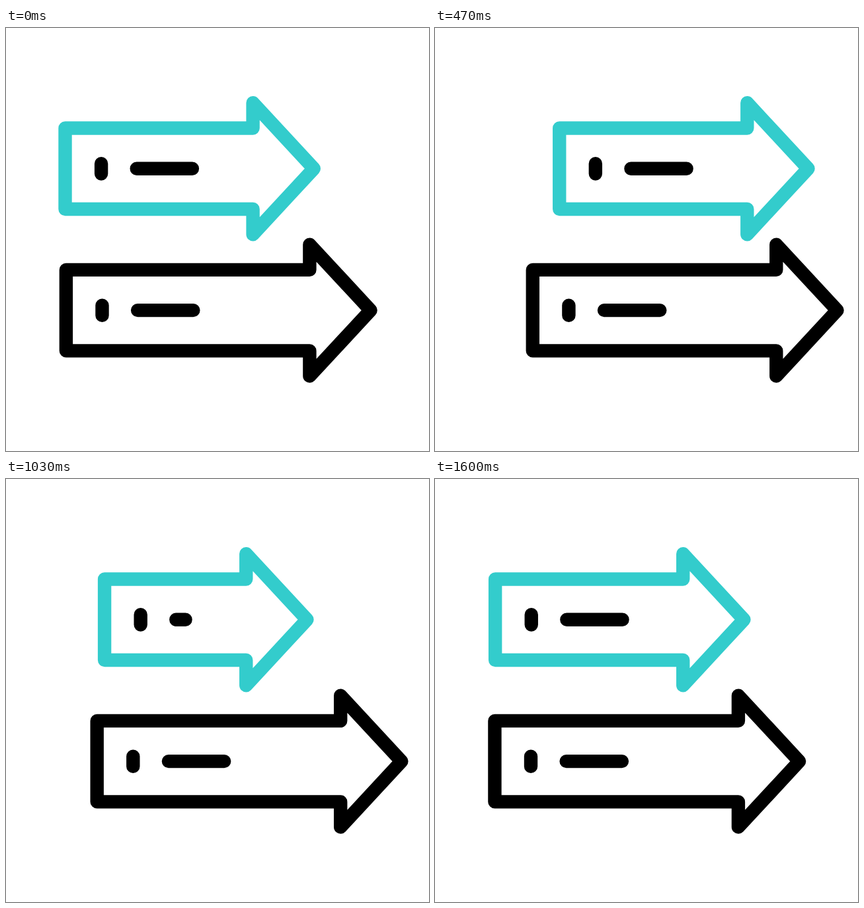
An HTML page that plays this animation: 640x640 px, repeating every 1670 ms.

```html
<!DOCTYPE html>
<html lang="en">
<head>
<meta charset="utf-8">
<title>Two arrows</title>
<style>
  html, body { margin: 0; width: 100%; height: 100%; overflow: hidden; background: #fff; }
  svg { display: block; width: 100vw; height: 100vh; }
  path { fill: none; stroke: #000; stroke-width: 20.4; stroke-linecap: round; stroke-linejoin: round; }
  #topBody { stroke: #3cc; }
</style>
</head>
<body>
<svg viewBox="0 0 640 640">
  <path id="topBody"/>
  <path id="topMarks"/>
  <g transform="translate(0 214.4)">
    <path id="lowBody"/>
    <path id="lowMarks"/>
  </g>
</svg>
<script>
const LOOP = 1670;
const byId = id => document.getElementById(id);

// Smooth 0 to 1 between steps a and b.
function ramp(s, a, b) {
  const u = Math.min(1, Math.max(0, (s - a) / (b - a)));
  return u * u * (3 - 2 * u);
}

// Up from a to b, back down from c to d.
const swing = (s, a, b, c, d) => ramp(s, a, b) - ramp(s, c, d);

function drawArrow(name, x, len, dashEnd) {
  const end = x + len;
  byId(name + 'Body').setAttribute('d',
    `M${x} 151.5H${end}V113.3L${end + 92.2} 212.7L${end} 312.2V274H${x}Z`);
  byId(name + 'Marks').setAttribute('d',
    `M${x + 54.6} 205.2V220.5M${x + 108.2} 212.7H${x + dashEnd}`);
}

// 30 steps per second on a 10 ms clock, resting on the last pose.
function stepAt(ms) {
  const ticks = Math.floor((ms % LOOP) / 10);
  return Math.min(48, Math.floor((ticks * 3 + 1) / 10));
}

function render(ms) {
  const s = stepAt(ms);
  const topX = 89.5 + 113 * swing(s, 0, 18, 18, 24.8) + 134.7 * swing(s, 25, 38, 38, 48.7);
  const lowX = 90.2 + 67.2 * (swing(s, -0.6, 9.4, 11.1, 23.3) + swing(s, 23.3, 35.3, 36.4, 48.4));
  const len = 284.1 - 76 * swing(s, 17.2, 29.3, 29.3, 39.1);
  drawArrow('top', topX, len, len - 91.7);
  drawArrow('low', lowX, 368.5, 192.5);
}

const start = performance.now();
function tick() {
  render(performance.now() - start);
  requestAnimationFrame(tick);
}
tick();
</script>
</body>
</html>
```
